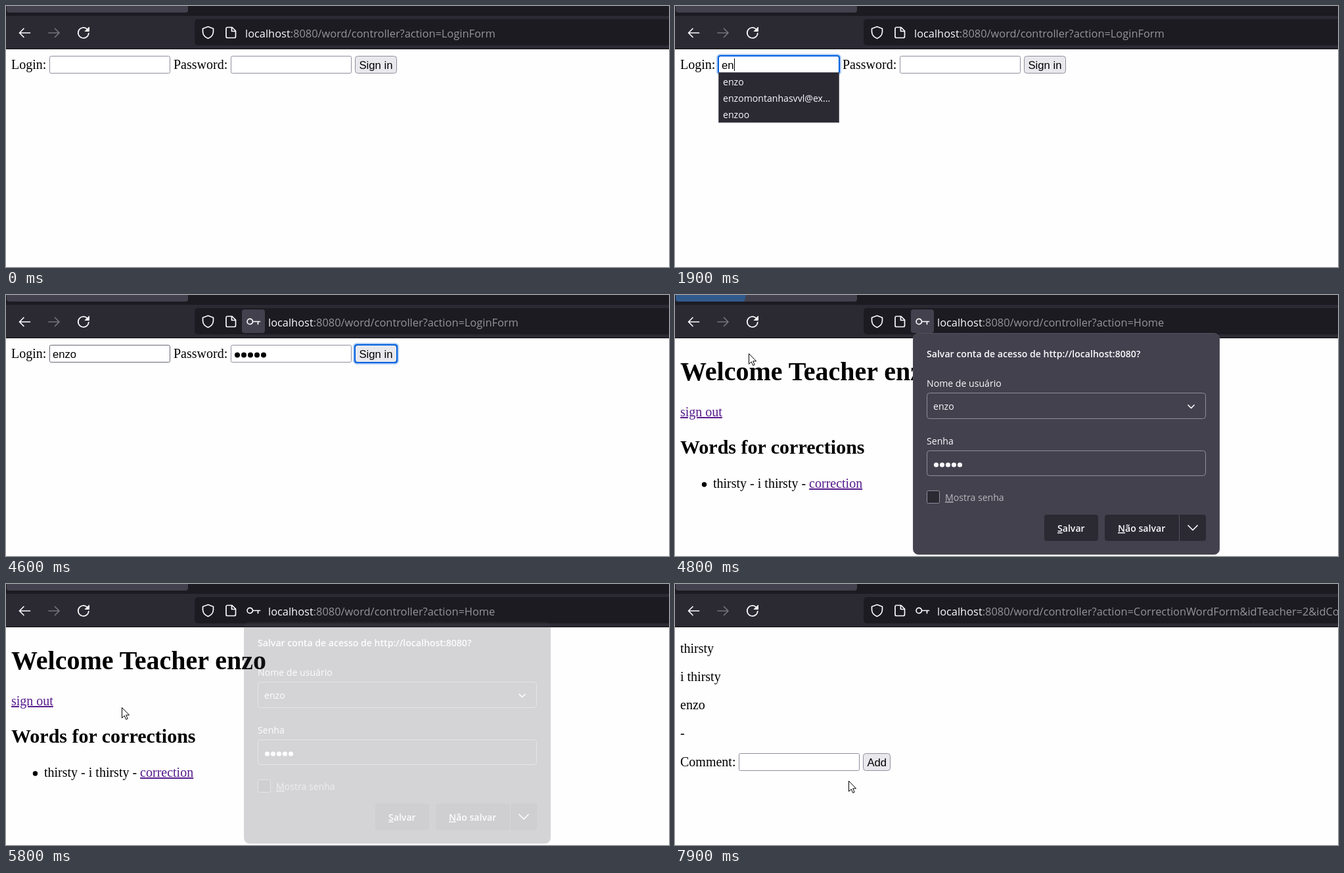
Animation of 1009x398 px, one loop 8000 ms. Source, as an HTML page:

```html
<!DOCTYPE html>
<html lang="en">
<head>
<meta charset="utf-8">
<title>Login flow</title>
<style>
  html, body { margin: 0; width: 100%; height: 100%; overflow: hidden; background: #fefefe; }
  svg { display: block; }
  text { white-space: pre; }
  .page { font: 20px "Liberation Serif", Times, serif; }
  .h1 { font-size: 40px; font-weight: bold; }
  .h2 { font-size: 30px; font-weight: bold; }
  .link { fill: #551a8b; text-decoration: underline; }
  .link.active { fill: #e00; }
  .control { font: 16.67px "Liberation Sans", Arial, sans-serif; }
  .field { fill: #fff; stroke: #8f8f9d; }
  .hover { stroke: #676774; }
  .button { fill: #e9e9ed; stroke: #8f8f9d; }
  .url { font: 16.4px "Open Sans", "Noto Sans", sans-serif; fill: #95949b; }
  .ui { font: 14.1px "Open Sans", "Noto Sans", sans-serif; fill: #fbfbfe; }
  .strong { font-weight: 600; }
  .key { text-decoration: underline; }
  .dark { fill: #2b2a33; }
  .icon { fill: none; stroke: #fbfbfe; stroke-width: 1.7; stroke-linecap: round; stroke-linejoin: round; }
  .ring { fill: none; stroke: #0060df; stroke-width: 2; }
</style>
</head>
<body>
<svg width="1009" height="398" viewBox="0 0 1009 398">
  <defs>
    <clipPath id="tabShape"><path d="M1 0H277V6a4 4 0 0 1-4 4H5a4 4 0 0 1-4-4z"/></clipPath>
  </defs>
  <rect width="1009" height="398" fill="#fefefe"/>

  <!-- browser chrome -->
  <rect width="1009" height="15" fill="#1c1b22"/>
  <rect y="15" width="1009" height="50" class="dark"/>
  <rect y="65" width="1009" height="1" fill="#0c0c0d"/>
  <g clip-path="url(#tabShape)">
    <rect width="278" height="10" fill="#42414d"/>
    <circle id="burst" cx="24" cy="-18" fill="#315a8c"/>
  </g>
  <rect x="287" y="20" width="740" height="40" rx="5" fill="#1c1b22"/>
  <rect id="keyBack" x="359" y="22" width="35" height="36" rx="4" fill="#42414d"/>
  <g class="icon">
    <path d="M36.500 41H20.500M27 34.500L20.500 41L27 47.500"/>
    <path d="M65 41H81M74.500 34.500L81 41L74.500 47.500" stroke="#75747b"/>
    <path d="M125.800 41.500A8 8 0 1 1 123.500 35.300"/>
    <path d="M126.500 32.500V38.500H120.500z" fill="#fbfbfe" stroke-width="1"/>
    <path d="M307.500 31.500L315.500 34.500V39.500Q315 46.500 307.500 49.500Q300 46.500 299.500 39.500V34.500z"/>
    <path d="M336.500 32.500H344L349.500 38V46.500a2 2 0 0 1-2 2H337a2 2 0 0 1-2-2V34.500a2 2 0 0 1 1.500-2zM343.500 33V38.500H349"/>
    <path id="keyIcon" d="M375.500 40.500a4.200 4.200 0 1 1-8.400 0a4.200 4.200 0 1 1 8.400 0H386.500M383.500 41V44.500"/>
  </g>
  <text id="url" class="url" y="47.500"><tspan fill="#fbfbfe">localhost</tspan>:8080/word/controller?action=<tspan id="action"></tspan></text>

  <!-- login form -->
  <g id="login" class="page">
    <text x="8" y="96">Login:</text>
    <text x="255" y="96">Password:</text>
    <rect id="userField" class="field" x="66.500" y="76.500" width="183" height="26" rx="2"/>
    <rect class="field" x="342.500" y="76.500" width="183" height="26" rx="2"/>
    <rect class="button" x="531.500" y="76.500" width="63" height="26" rx="4"/>
    <g id="focus" class="ring">
      <rect id="halo" y="74" height="31" rx="5" stroke-opacity=".32"/>
      <rect id="outline" y="76" height="27" rx="3"/>
    </g>
    <text id="user" class="control" x="71" y="96"></text>
    <g id="dots"></g>
    <text class="control" x="537.500" y="96">Sign in</text>
    <rect id="caret" y="80" width="1" height="19"/>
    <g id="menu">
      <rect id="menuBox" class="dark" x="66.500" y="101.500" width="183" stroke="#5b5b66"/>
      <g id="menuRows" class="ui"></g>
    </g>
  </g>

  <!-- teacher home -->
  <g id="home" class="page">
    <text class="h1" x="8" y="130">Welcome Teacher enzo</text>
    <text class="link" x="8" y="185">sign out</text>
    <text class="h2" x="8" y="242">Words for corrections</text>
    <circle cx="44.500" cy="289" r="3.700"/>
    <text x="58" y="294">thirsty - i thirsty - <tspan id="correction" class="link">correction</tspan></text>
  </g>

  <!-- correction form -->
  <g id="form" class="page">
    <text x="8" y="105">thirsty</text>
    <text x="8" y="148">i thirsty</text>
    <text x="8" y="191">enzo</text>
    <text x="8" y="234">-</text>
    <text x="8" y="278">Comment:</text>
    <rect class="field" x="97.500" y="258.500" width="183" height="26" rx="2"/>
    <rect class="button" x="286.500" y="258.500" width="41" height="26" rx="4"/>
    <text class="control" x="292.500" y="278">Add</text>
  </g>

  <!-- save-password panel -->
  <g id="panel" class="ui">
    <rect x="362.500" y="58.500" width="466" height="337" rx="8" fill="#42414d" stroke="#52525e"/>
    <text class="strong" x="383" y="95">Salvar conta de acesso de http://localhost:8080?</text>
    <text x="383" y="140">Nome de usuário</text>
    <text x="383" y="228">Senha</text>
    <g fill="none" stroke="#8f8f9d">
      <rect x="383.500" y="149.500" width="424" height="39" rx="4"/>
      <rect x="383.500" y="237.500" width="424" height="38" rx="4"/>
      <rect class="dark" x="383.500" y="298.500" width="19" height="19" rx="2"/>
    </g>
    <text x="393" y="175">enzo</text>
    <g id="panelDots"></g>
    <text x="411" y="314" fill="#b9b8bf"><tspan class="key">M</tspan>ostra senha</text>
    <rect class="dark" x="562" y="335" width="82" height="40" rx="4"/>
    <rect class="dark" x="654" y="335" width="154" height="40" rx="4"/>
    <rect x="767" y="335" width="1" height="40" fill="#52525e"/>
    <g class="strong">
      <text x="582" y="361"><tspan class="key">S</tspan>alvar</text>
      <text x="674" y="361"><tspan class="key">N</tspan>ão salvar</text>
    </g>
    <path class="icon" d="M781 168L785.500 172.500L790 168M781 351.500L788 358.500L795 351.500"/>
  </g>

  <!-- pointer -->
  <g id="pointer" fill="#fff" stroke="#000" stroke-linejoin="round">
    <path id="arrow" d="M.5.500V16.300L4.200 12.800L6.700 18.500L9.200 17.400L6.700 11.900H11.600z"/>
    <path id="beam" fill="none" d="M-3-8.500H3M0-8.500V8.500M-3 8.500H3"/>
    <path id="hand" d="M5 14V2.500a1.700 1.700 0 0 1 3.400 0V9q1.600-1 3 .6q1.500-.7 2.700.8q2.700-.5 2.700 1.800V17l-2 4.500V23.500H7V21.500L1.400 15.500Q-.2 13.100 2.200 12.600Q3.600 12.600 5 14z"/>
  </g>
</svg>

<script>
const $ = id => document.getElementById(id);
const show = (id, on) => { $(id).style.display = on ? "" : "none"; };
const attr = (id, values) => {
  for (const name in values) $(id).setAttribute(name, values[name]);
};

const DURATION = 8000, STEP = 100;
const names = ["enzo", "enzomontanhasvvl@ex...", "enzoo", "aluno", "teste", "admin"];

// Each track lists [start time, value]; a value holds until the next one.
const tracks = {
  page: [[0, "login"], [4700, "home"], [7300, "form"]],
  action: [[0, "LoginForm"], [4700, "Home"], [7300, "CorrectionWordForm&idTeacher=2&idCorrection=2"]],
  typed: [[0, 0], [1700, 1], [1900, 2], [2100, 3], [2200, 4]],
  rows: [[0, 0], [1400, 6], [1800, 3], [2300, 0]],
  dots: [[0, 0], [2900, 1], [3300, 2], [3500, 3], [3700, 4], [4000, 5]],
  focus: [[0, ""], [1300, "user"], [2400, "password"], [4300, "button"]],
  panel: [[0, 0], [4700, .6], [4800, 1], [5700, .65], [5800, .22], [5900, 0]],
  burst: [[0, 0], [4800, 86], [4900, 190], [5000, 0], [7400, 86], [7500, 190], [7600, 0]],
  pointer: [[0, ""], [400, "arrow"], [900, "beam"], [1700, ""], [4700, "arrow"], [6700, "hand"], [7900, "arrow"]]
};
const boxes = { user: [66, 184], password: [342, 184], button: [531, 64] };
const path = [
  [400, 119, 48], [700, 102, 71], [800, 102, 71], [900, 108, 84], [1000, 112, 89],
  [5300, 112, 89], [5500, 176, 188], [6100, 176, 188], [6700, 264, 295],
  [6800, 264, 295], [6900, 262, 295], [7800, 262, 295], [7900, 264, 300]
];

function pointAt(t) {
  const next = path.findIndex(p => p[0] > t);
  if (next < 1) return (next ? path[path.length - 1] : path[0]).slice(1);
  const [t0, x0, y0] = path[next - 1], [t1, x1, y1] = path[next];
  const k = (t - t0) / (t1 - t0);
  return [x0 + (x1 - x0) * k, y0 + (y1 - y0) * k].map(Math.round);
}

const dotRow = (x, y, gap, r) => Array.from({ length: 5 }, (_, i) =>
  `<circle cx="${x + gap * i}" cy="${y}" r="${r}"/>`).join("");
$("dots").innerHTML = dotRow(352, 91.5, 10, 4);
$("panelDots").innerHTML = dotRow(397.5, 259, 9, 3.6);
$("menuRows").innerHTML = names.map((name, i) =>
  `<text x="73" y="${121 + 25 * i}">${name}</text>`).join("");

function draw(t) {
  const now = {};
  for (const name in tracks) now[name] = tracks[name].filter(e => e[0] <= t).pop()[1];

  for (const page of ["login", "home", "form"]) show(page, page === now.page);
  $("action").textContent = now.action;
  attr("url", { x: t < 3000 ? 364 : 399 });
  show("keyIcon", t >= 3000);
  show("keyBack", t >= 4600 && t < 5800);
  attr("burst", { r: now.burst, opacity: now.burst > 100 ? .5 : 1 });

  $("userField").classList.toggle("hover", t >= 900);
  $("user").textContent = names[0].slice(0, now.typed);
  [...$("dots").children].forEach((dot, i) => { dot.style.display = i < now.dots ? "" : "none"; });
  show("focus", now.focus);
  if (now.focus) {
    const [x, width] = boxes[now.focus];
    attr("outline", { x, width });
    attr("halo", { x: x - 2, width: width + 4 });
  }
  show("caret", now.focus === "user" || now.focus === "password");
  const caretX = now.focus === "user" && now.page === "login"
    ? 71 + $("user").getComputedTextLength() : 347 + 10 * now.dots;
  attr("caret", { x: Math.round(caretX) });

  show("menu", now.rows);
  attr("menuBox", { height: 25 * now.rows + 1 });
  [...$("menuRows").children].forEach((row, i) => { row.style.display = i < now.rows ? "" : "none"; });

  show("panel", now.panel);
  attr("panel", { opacity: now.panel });
  $("correction").classList.toggle("active", t >= 7100);

  for (const kind of ["arrow", "beam", "hand"]) show(kind, kind === now.pointer);
  attr("pointer", { transform: `translate(${pointAt(t)})` });
}

const start = performance.now();
function tick() {
  const t = (performance.now() - start) % DURATION;
  draw(Math.floor(t / STEP) * STEP);
  requestAnimationFrame(tick);
}
tick();
</script>
</body>
</html>
```
